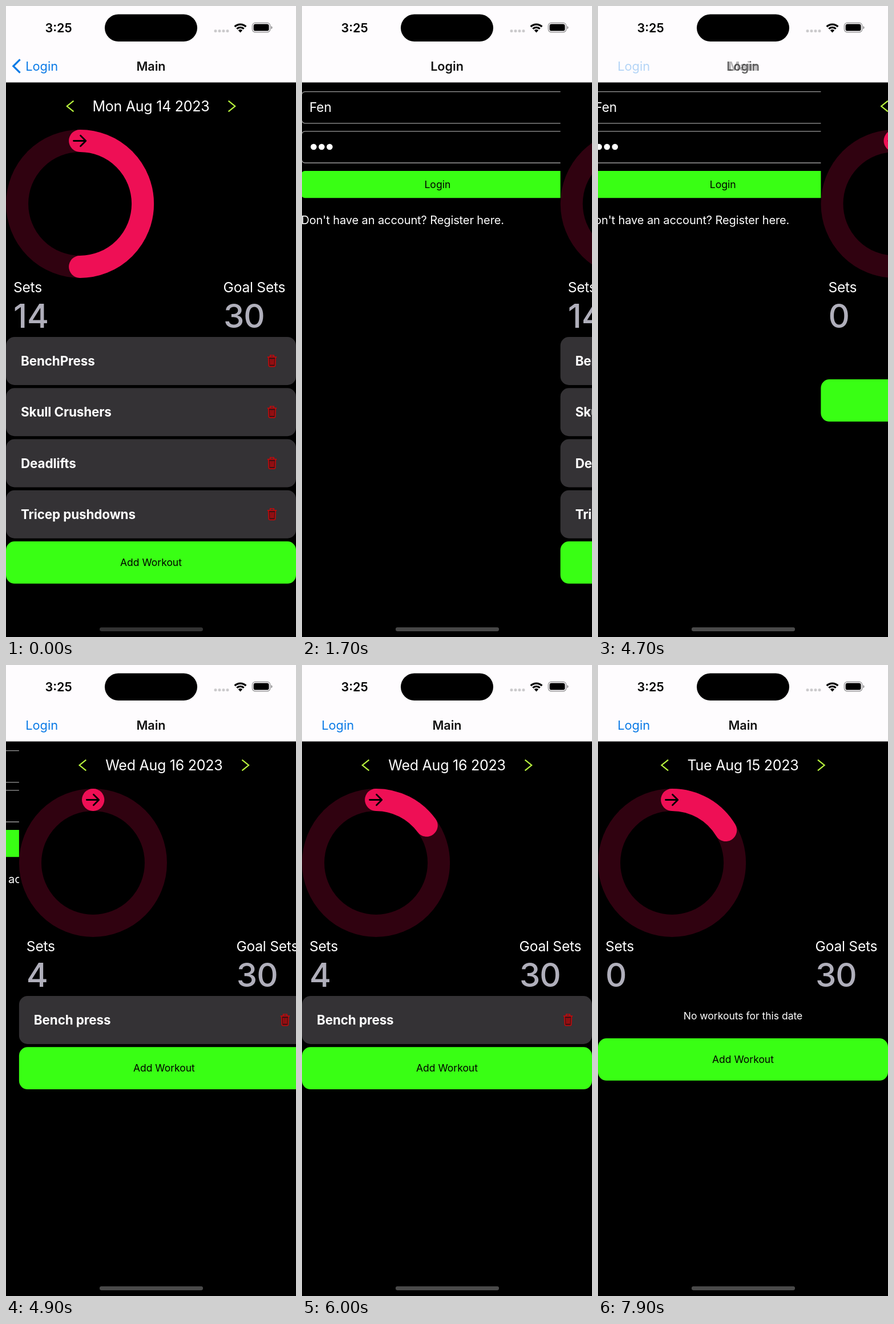
An HTML page that plays this animation: 508 px wide and 1102 px high, repeating every 8000 ms.

```html
<!DOCTYPE html>
<html lang="en">
<head>
<meta charset="utf-8">
<title>Workout tracker</title>
<style>
  html, body { margin: 0; width: 100%; height: 100%; overflow: hidden; background: #000; }
  svg { display: block; width: 100vw; height: 100vh; }
  text { font-family: Inter, Roboto, sans-serif; white-space: pre; }
</style>
</head>
<body>
<svg id="stage" viewBox="0 0 508 1102"></svg>
<script>
const LOOP = 8000, W = 508;
const GREEN = '#39ff14', PINK = '#ee0f55', BLUE = '#0a7ae6';
const POP = 1510, PUSH = 4655;
const RING = { x: 129.6, y: 345.4, r: 110 };

const label = (s, x, y, size, fill = '#fff', extra = '') =>
  `<text x="${x}" y="${y}" font-size="${size}" fill="${fill}" ${extra}>${s}</text>`;
const box = (x, y, w, h, r, fill, extra = '') =>
  `<rect x="${x}" y="${y}" width="${w}" height="${h}" rx="${r}" fill="${fill}" ${extra}/>`;
const line = (d, color, width, extra = '') =>
  `<path d="${d}" fill="none" stroke="${color}" stroke-width="${width}" ${extra}/>`;
const MID = 'text-anchor="middle"';
const SEMI = 'font-weight="600"';
const ROUND = 'stroke-linecap="round" stroke-linejoin="round"';

// Clockwise arc, angles in degrees from the top
function arc(cx, cy, r, from, to) {
  const pt = a => {
    const k = a * Math.PI / 180;
    return `${(cx + r * Math.sin(k)).toFixed(2)} ${(cy - r * Math.cos(k)).toFixed(2)}`;
  };
  return `M${pt(from)}A${r} ${r} 0 ${to - from > 180 ? 1 : 0} 1 ${pt(to)}`;
}

function statusBar() {
  const dots = [367, 374, 381, 388].map(x => box(x - 2.4, 41.2, 4.8, 4.8, 1.7, '#cbcacc')).join('');
  const wifi = line(arc(410.5, 46, 13.9, -45, 45), '#000', 3.4)
    + line(arc(410.5, 46, 8.7, -45, 45), '#000', 3.2)
    + '<path d="M410.5 46.4L406.8 42.5Q410.5 39.6 414.2 42.5Z"/>';
  const battery = box(431.4, 29.4, 31.4, 16.4, 5.2, 'none', 'stroke="#8d8c8e" stroke-width="1.2"')
    + box(433.6, 31.6, 27, 12, 3.4, '#000')
    + '<path d="M464.4 35q2.2 .9 2.2 2.7t-2.2 2.7z" fill="#8d8c8e"/>';
  return label('3:25', 68.4, 46, 21.6, '#000', SEMI)
    + box(173, 14.5, 162, 47.5, 23.75, '#000') + dots + wifi + battery;
}

function header() {
  return box(0, 0, W, 133.5, 0, '#fefcfe') + statusBar()
    + label('Main', 254, 112.5, 21.6, '#111', `id="mainTitle" ${SEMI} ${MID}`)
    + label('Login', 254, 112.5, 21.6, '#111', `id="loginTitle" ${SEMI} ${MID}`)
    + `<g id="back">${label('Login', 34.2, 113, 21.8, BLUE)}`
    + line('M24.6 93.3L12.8 105L24.6 116.7', BLUE, 3.2, 'id="backArrow"') + '</g>';
}

function loginView() {
  const field = y => box(16, y, 476.5, 55.2, 6, '#000', 'stroke="#9b9b9b" stroke-width="1.3"');
  const dots = [37, 51, 65].map(x => `<circle cx="${x}" cy="246" r="5.3" fill="#fff"/>`).join('');
  return field(149.6) + field(218.8) + dots
    + label('Fen', 29.5, 185.2, 22.6)
    + box(15.5, 288, 477.5, 47.3, 6, GREEN)
    + label('Login', 254, 318.2, 17.6, '#000', MID)
    + label("Don't have an account? Register here.", 15, 381.3, 20, '#fff', 'letter-spacing="-.1"');
}

function mainView() {
  const { x, y, r } = RING;
  const tight = 'letter-spacing="-.25"';
  return box(0, 133, W, 969, 0, '#000')
    + label('', 254, 184.4, 25, '#fff', `id="date" ${MID} ${tight}`)
    + line('M13 -9.3L1.4 0L13 9.3', '#b9f73e', 2.2, 'id="prev"')
    + line('M-13 -9.3L-1.4 0L-13 9.3', '#b9f73e', 2.2, 'id="next"')
    + `<circle cx="${x}" cy="${y}" r="${r}" fill="none" stroke="#300210" stroke-width="39"/>`
    + line('', PINK, 39, 'id="ring" stroke-linecap="round"')
    + line('M118.5 235.5H139.5M130.5 226.3L139.8 235.5L130.5 244.7', '#000', 2.8, ROUND)
    + label('Sets', 13, 500, 24.6, '#fff', tight)
    + label('Goal Sets', 380.6, 500, 24.6, '#fff', tight)
    + label('', 13, 562, 58, '#b0afbb', 'id="sets" font-weight="500"')
    + label('30', 381, 562, 58, '#b0afbb', 'font-weight="500" letter-spacing="-1"')
    + '<g id="list"></g>';
}

function trash(y) {
  return `<g transform="translate(466 ${y})" stroke="#c4090b" fill="none" stroke-width="1.7">`
    + '<path d="M-6.2 -6.2L-5.6 8.2Q-5.5 9.8 -4 9.8H4Q5.5 9.8 5.6 8.2L6.2 -6.2" fill="#3a1215"/>'
    + '<path d="M-8.2 -6.6H8.2M-3.2 -6.8V-9.8H3.2V-6.8"/>'
    + '<path d="M-2.9 -3.6L-2.5 6.8M0 -3.6V6.8M2.9 -3.6L2.5 6.8" stroke="#ae0e11" stroke-width="2"/></g>';
}

function list(items) {
  const top = i => 578 + 89.25 * i;
  const cards = items.map((name, i) =>
    box(0, top(i), W, 84, 15, '#343235')
    + label(name, 26, top(i) + 50.2, 22.4, '#fff', 'font-weight="700" letter-spacing="-.1"')
    + trash(top(i) + 41.8)).join('');
  const empty = items.length ? '' : label('No workouts for this date', 254, 618.6, 17.5, '#fff', MID);
  const y = items.length ? top(items.length) : 652;
  return cards + empty + box(0, y, W, 73.8, 15, GREEN)
    + label('Add Workout', 254, y + 43, 17.5, '#000', MID);
}

const DAYS = {
  mon: ['Mon Aug 14 2023', 148.6],
  tue: ['Tue Aug 15 2023', 144],
  wed: ['Wed Aug 16 2023', 149.6]
};
const PLANS = {
  full: [14, ['BenchPress', 'Skull Crushers', 'Deadlifts', 'Tricep pushdowns']],
  one: [4, ['Bench press']],
  none: [0, []]
};

const stage = document.getElementById('stage');
stage.innerHTML = `<g id="login">${loginView()}</g><g id="main">${mainView()}</g>${header()}`
  + box(164, 1085.3, 181, 6.6, 3.3, '#333')
  + box(164, 1085.3, 181, 6.6, 3.3, '#4a4a4a', 'id="homeBar"');
const ui = {};
stage.querySelectorAll('[id]').forEach(el => ui[el.id] = el);

const clamp = v => Math.max(0, Math.min(1, v));
const ease = v => (v = clamp(v), v < .5 ? 2 * v * v : 1 - 2 * (1 - v) ** 2);
// Critically damped spring from 0 to 1
const spring = ms => {
  const k = Math.max(0, ms) * .0198;
  const v = 1 - (1 + k) * Math.exp(-k);
  return v > .9996 ? 1 : v;
};
const shift = (el, x, y = 0) => el.setAttribute('transform', `translate(${x.toFixed(2)} ${y})`);
const fade = (el, v) => el.setAttribute('opacity', clamp(v).toFixed(3));

let shownDay, shownPlan;
function showDay(day) {
  if (day === shownDay) return;
  shownDay = day;
  const [text, half] = DAYS[day];
  ui.date.textContent = text;
  shift(ui.prev, 254 - half, 175);
  shift(ui.next, 254 + half, 175);
}
function showPlan(plan) {
  if (plan === shownPlan) return;
  shownPlan = plan;
  const [sets, items] = PLANS[plan];
  ui.sets.textContent = sets;
  ui.list.innerHTML = list(items);
}

function render(t) {
  const leaving = t < PUSH;
  const p = spring(t - (leaving ? POP : PUSH));
  const x = W * (leaving ? p : 1 - p);
  shift(ui.main, x);
  shift(ui.login, -.3 * (W - x));

  const out = 1 - 1.5 * p, inn = 1.3 * p;
  fade(ui.mainTitle, leaving ? out : inn);
  fade(ui.loginTitle, leaving ? inn : out);
  fade(ui.back, leaving ? (t < 1390 ? 1 : .32 * out) : inn);
  fade(ui.backArrow, leaving ? 1 : 0);
  fade(ui.homeBar, leaving ? p : 1);

  showDay(leaving ? 'mon' : t < 7490 ? 'wed' : 'tue');
  showPlan(leaving ? 'full' : t < 4845 || t >= 7590 ? 'none' : 'one');

  const angle = leaving ? 180
    : 60 * ease((t - 4845) / 1500) - 48 * ease((t - 7735) / 1500);
  ui.ring.setAttribute('d', arc(RING.x, RING.y, RING.r, 0, Math.max(.1, angle)));
}

const start = performance.now();
function tick() {
  render((performance.now() - start) % LOOP);
  requestAnimationFrame(tick);
}
render(0);
requestAnimationFrame(tick);
</script>
</body>
</html>
```
